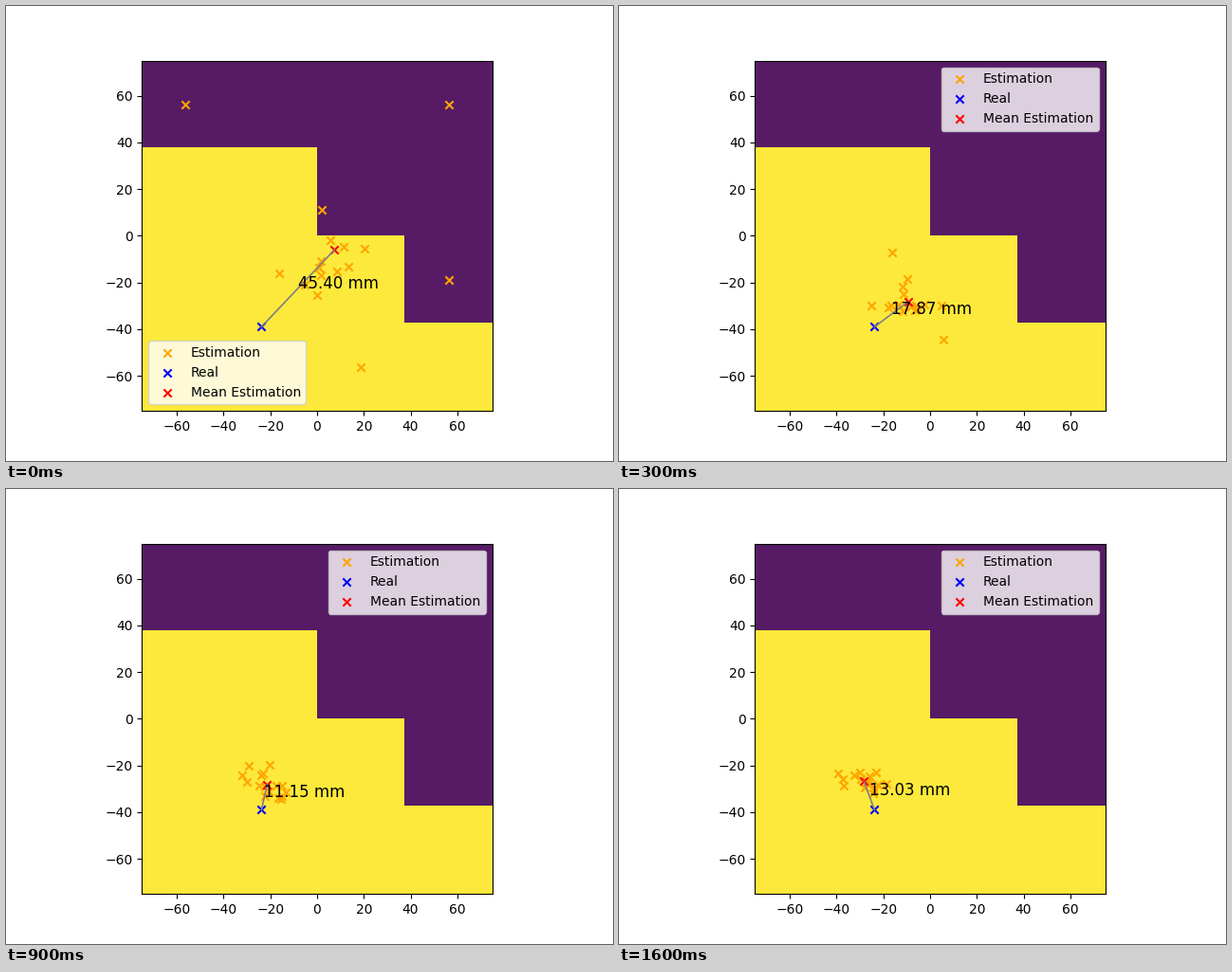
A matplotlib script for the animation above (1700 ms loop, 640x480 px).

```python
import numpy as np
import matplotlib.pyplot as plt
from matplotlib.animation import FuncAnimation

FRAMES, INTERVAL = 17, 100
HALF, CELL = 75, 37.5
COUNT = 16
REAL = np.array([-23.8, -39.0])

# Path of the mean estimate: step, x, y
PATH = np.array([(0, 7.4, -6.02), (1, 2.85, -11.83), (2, -6.41, -28.3),
                 (5, -15.7, -28.2), (7, -19, -29.06), (11, -23.8, -27.17),
                 (16, -28.3, -26.77)])

# Early outliers, in the order in which they are forgotten
STRAYS = np.array([(-1.5, 1.5), (1.5, -0.5), (0.5, -1.5), (1.5, 1.5),
                   (0.05, 0.3), (0, 0.26), (-0.46, -1.68)]) * CELL

LEGEND_LOC = {0: "lower left", 1: "upper left"}


def estimates(i):
    """Return the estimates at step i and their mean."""
    steps, xs, ys = PATH.T
    mean = np.array([np.interp(i, steps, xs), np.interp(i, steps, ys)])
    strays = STRAYS[(5 * i + 1) // 2:5 + i]

    # The remaining points scatter so that the whole set has the right mean
    n = COUNT - len(strays)
    spread = 5.5 + 4.5 * np.exp(-i / 4), 3 + 6 * np.exp(-i / 5)
    near = np.random.default_rng(i).normal(0, spread, (n, 2))
    near += (COUNT * mean - strays.sum(axis=0)) / n - near.mean(axis=0)
    return np.vstack([strays, near]), mean


fig, ax = plt.subplots(figsize=(6.4, 4.8), dpi=100)
room = np.array([[0, 0, 0, 0],
                 [1, 1, 0, 0],
                 [1, 1, 1, 0],
                 [1, 1, 1, 1]])
ax.imshow(room, extent=[-HALF, HALF, -HALF, HALF], alpha=0.9)

cloud = ax.scatter([], [], marker="x", color="orange", label="Estimation")
ax.scatter(*REAL, marker="x", color="blue", label="Real")
center = ax.scatter([], [], marker="x", color="red", label="Mean Estimation")
link, = ax.plot([], [], color="gray", linewidth=1.2)
label = ax.text(0, 0, "", fontsize=12)
ax.set_xlim(-HALF, HALF)
ax.set_ylim(-HALF, HALF)


def update(i):
    points, mean = estimates(i)
    cloud.set_offsets(points)
    center.set_offsets([mean])
    link.set_data(*zip(REAL, mean))
    label.set_position((REAL + mean) / 2)
    label.set_text(f"{np.hypot(*(mean - REAL)):.2f} mm")
    legend = ax.legend(loc=LEGEND_LOC.get(i, "upper right"))
    return cloud, center, link, label, legend


anim = FuncAnimation(fig, update, frames=FRAMES, interval=INTERVAL,
                     repeat=True, repeat_delay=0)
plt.show()
```
